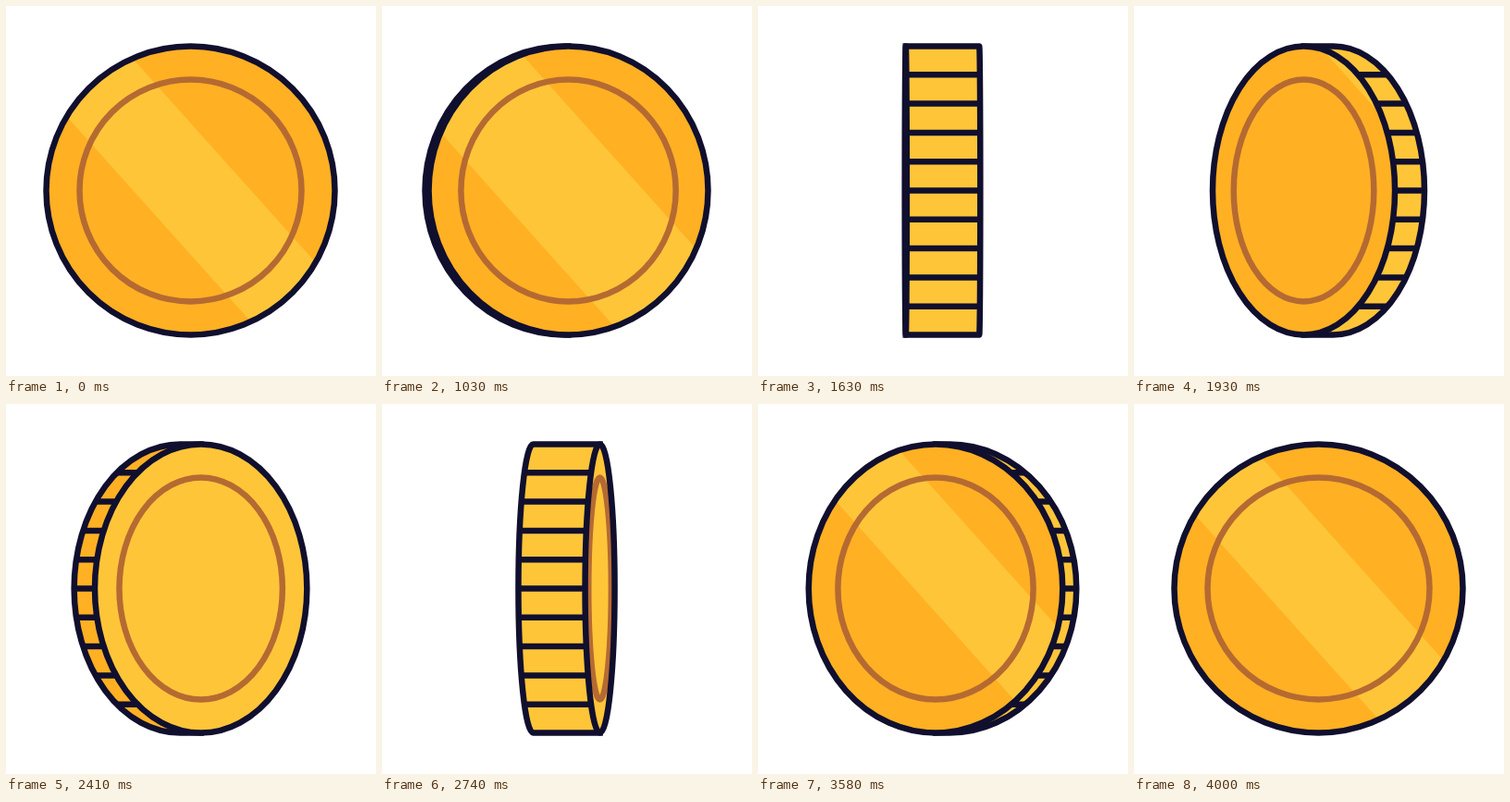
An HTML page with a canvas for the animation above (4.03 s loop, 400 by 400 pixels).

```html
<!DOCTYPE html>
<html lang="en">
<head>
<meta charset="utf-8">
<title>Spinning coin</title>
<style>
  html, body { margin: 0; width: 100%; height: 100%; overflow: hidden; background: #fff; }
  canvas { display: block; width: 400px; height: 400px; }
</style>
</head>
<body>
<canvas id="stage"></canvas>
<script>
const LOOP = 4030, STEP = 30;
const MID = 199.5, RADIUS = 156, RING = 120, HALF_DEPTH = 40, LINE = 6.5;
const NAVY = '#100f2e', BROWN = '#b56a32';
const ORANGE = [255, 176, 35], LIGHT = [255, 197, 57];

// Quarter turns: side is where the face sits (+1 right, -1 left),
// low/high are how far the gleam's edges travel as the coin narrows.
const TURNS = [
  { from: 1000, to: 1627, side: 1, power: 1.13, depth: 0.87, low: -560, high: 560 },
  { from: 1627, to: 2198, side: -1, power: 1.32, depth: 0.92, low: 551, high: 551 },
  { from: 2198, to: 2787, side: 1, power: 1.3, depth: 0.96, low: -560, high: 560 },
  { from: 2787, to: 4000, side: -1, power: 2, depth: 0.79, low: 262, high: 180 }
];

const canvas = document.getElementById('stage');
const ctx = canvas.getContext('2d');
const ratio = window.devicePixelRatio || 1;
canvas.width = canvas.height = 400 * ratio;
ctx.scale(ratio, ratio);

const clamp = v => Math.min(1, Math.max(0, v));
const mix = (a, b, k) => `rgb(${a.map((v, i) => Math.round(v + (b[i] - v) * k))})`;

function poseAt(time) {
  const turn = TURNS.find(q => time >= q.from && time < q.to);
  if (!turn) return { narrow: 0, shift: 0, side: 1, low: 0, high: 0 };
  const p = (time - turn.from) / (turn.to - turn.from);
  const narrow = Math.pow(turn.side > 0 ? p : 1 - p, turn.power);
  return {
    narrow,
    side: turn.side,
    shift: turn.side * HALF_DEPTH * Math.pow(narrow, turn.depth),
    low: turn.low * narrow,
    high: turn.high * narrow
  };
}

function oval(x, rx, ry) {
  ctx.beginPath();
  ctx.ellipse(x, MID, rx, ry, 0, 0, Math.PI * 2);
}

function outline(color) {
  ctx.strokeStyle = color;
  ctx.lineWidth = LINE;
  ctx.stroke();
}

function drawRim(front, back, rx, pose) {
  const wide = 1 - pose.narrow;
  ctx.beginPath();
  ctx.moveTo(front, MID - RADIUS);
  ctx.lineTo(back, MID - RADIUS);
  ctx.ellipse(back, MID, rx, RADIUS, 0, -Math.PI / 2, Math.PI / 2, pose.side > 0);
  ctx.lineTo(front, MID + RADIUS);
  ctx.closePath();
  ctx.fillStyle = mix(ORANGE, LIGHT, pose.side < 0 ? 1 : clamp((0.45 - wide) / 0.33));
  ctx.fill();
  outline(NAVY);

  ctx.beginPath();
  for (let k = -4; k <= 4; k++) {
    const dy = k * 31.3;
    const reach = pose.side * rx * Math.sqrt(1 - (dy / RADIUS) ** 2);
    ctx.moveTo(back - reach, MID + dy);
    ctx.lineTo(front - reach, MID + dy);
  }
  outline(NAVY);
}

function drawFace(x, rx, pose) {
  const lean = 0.897 * 200;
  const low = 137.5 + pose.low, high = 265 + pose.high;
  ctx.save();
  oval(x, rx, RADIUS);
  ctx.fillStyle = mix(ORANGE, LIGHT, 0);
  ctx.fill();
  ctx.clip();
  ctx.beginPath();
  ctx.moveTo(low - lean, MID - 200);
  ctx.lineTo(high - lean, MID - 200);
  ctx.lineTo(high + lean, MID + 200);
  ctx.lineTo(low + lean, MID + 200);
  ctx.fillStyle = mix(ORANGE, LIGHT, 1);
  ctx.fill();
  oval(x, rx * RING / RADIUS, RING);
  outline(BROWN);
  ctx.restore();
  oval(x, rx, RADIUS);
  outline(NAVY);
}

function draw(time) {
  const pose = poseAt(time);
  const rx = Math.max(0.1, RADIUS * (1 - pose.narrow));
  ctx.fillStyle = '#fff';
  ctx.fillRect(0, 0, 400, 400);
  if (pose.shift) drawRim(MID + pose.shift, MID - pose.shift, rx, pose);
  drawFace(MID + pose.shift, rx, pose);
}

const start = performance.now();
function tick() {
  const t = (performance.now() - start) % LOOP;
  // The motion advances in even steps after the opening hold.
  draw(t < 1030 ? 0 : 1030 + Math.floor((t - 1030) / STEP) * STEP);
  requestAnimationFrame(tick);
}
tick();
</script>
</body>
</html>
```
